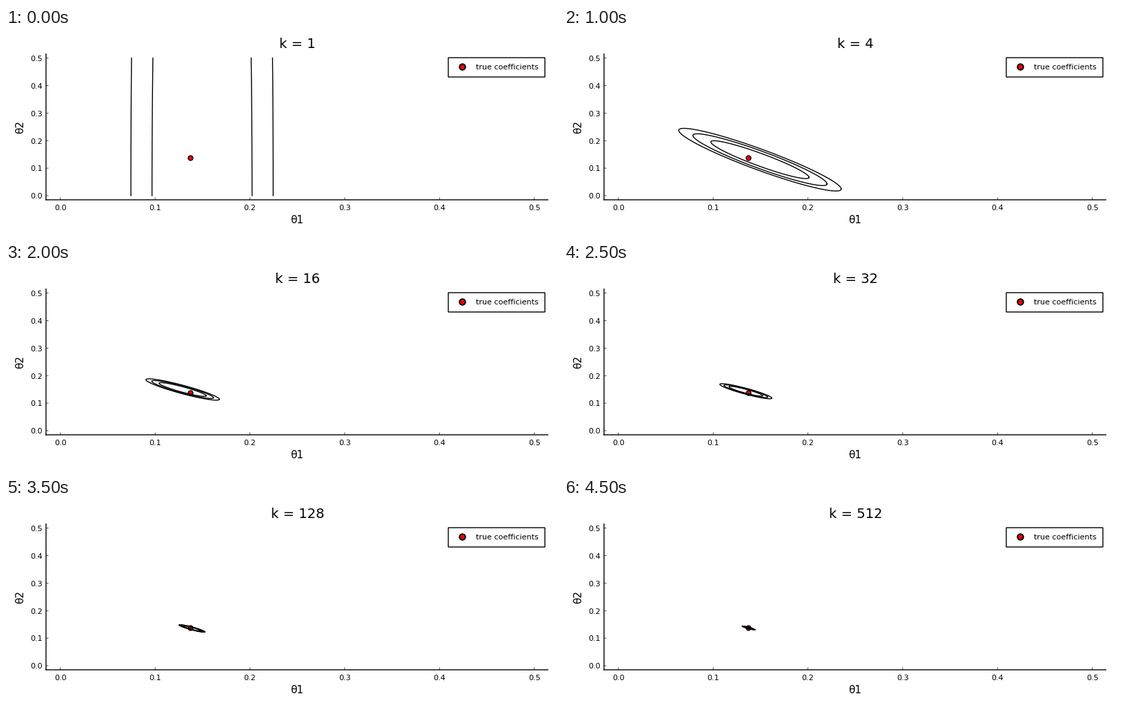
A matplotlib script for the animation above (5000 ms loop, 800x300 px).

```python
import numpy as np
import matplotlib.pyplot as plt
from matplotlib.animation import FuncAnimation
from matplotlib.patches import Rectangle

W, H, DPI = 800, 300, 100
PX = 72 / DPI
XS, YS = 1373.6, 399.0  # pixels per unit
TRUE = 0.137
LINE = 1.0
RED = "#f00000"

plt.rcParams["font.family"] = "DejaVu Sans"
fig = plt.figure(figsize=(W / DPI, H / DPI), dpi=DPI, facecolor="white")
ax = fig.add_axes([0, 0, 1, 1])
ax.set_xlim(0, W)
ax.set_ylim(H, 0)
ax.axis("off")


def px(v):
    return 78.8 + XS * v


def py(v):
    return 243.0 - YS * v


def label(x, y, s, size, ha="center"):
    return ax.text(x, y, s, fontsize=size, ha=ha, va="baseline")


def seg(x, y, width=LINE):
    ax.plot(x, y, color="black", lw=width, solid_capstyle="butt", snap=False)


def dot(x, y, size, edge):
    ax.plot([x], [y], "o", ms=size * PX, mfc=RED, mec="black", mew=edge * PX,
            zorder=2, snap=False)


# axes, ticks and labels
seg([58, 58], [37, 249.7])
seg([57.3, 786], [249, 249])
for v in np.arange(6) / 10:
    seg([px(v)] * 2, [249, 245.5], 0.5)
    seg([58, 61.5], [py(v)] * 2, 0.5)
    label(px(v), 264, f"{v:.1f}", 8)
    label(53.2, py(v) + 4.3, f"{v:.1f}", 8, ha="right")
label(422, 283.4, "θ1", 11)
ax.text(28, 143.2, "θ2", fontsize=11, rotation=90, ha="right", va="center")

# legend
ax.add_patch(Rectangle((641, 43), 140, 28, fc="white", ec="black", lw=LINE,
                       snap=False))
dot(661, 56.3, 8.6, 1.9)
label(681, 60.5, "true coefficients", 8, ha="left")

dot(px(TRUE), py(TRUE), 7.0, 1.3)

title = label(422.7, 29.2, "", 14)
curves = [ax.plot([], [], color="black", lw=LINE, zorder=3)[0] for _ in range(4)]

# path of the posterior mean from k = 2 on, as pixel offsets from the truth
MEANS = [(17, -38), (17, 2.5), (6.5, 0.5), (-11, -5), (-3.5, -2.5),
         (-3.5, -1.5), (2.5, 0.7), (2.5, 0.7), (0.5, 0)]
# half widths in data units and correlation while data are scarce
EARLY = {2: (0.0902, 0.1724, 0.85), 4: (0.0857, 0.1138, 0.935)}
T = np.linspace(0, 2 * np.pi, 241)


def spread(k):
    s = 0.155 / np.sqrt(k)
    return EARLY.get(k, (s, s, 0.915))


def bands():
    """Contours after one observation: only the first coefficient is known."""
    v = np.linspace(0, 1, 60)
    for half in (103.1, 72.5):
        dx = np.sqrt(half ** 2 - 185 * v ** 2)
        for side in (-1, 1):
            yield 284.1 + side * dx, py(v / 2)


def ellipses(n):
    """Evenly spaced log-density contours of a correlated Gaussian."""
    k = 2 ** n
    dx, dy = MEANS[n - 1]
    s1, s2, rho = spread(k)
    step = 0.285 + 0.13 / k
    for i in range(3):
        r = np.sqrt(1 - i * step)
        yield (px(TRUE) + dx + r * s1 * XS * np.cos(T),
               py(TRUE) + dy + r * s2 * YS * np.cos(T - np.arccos(rho)))


def draw(n):
    title.set_text(f"k = {2 ** n}")
    shapes = list(ellipses(n) if n else bands())
    for i, curve in enumerate(curves):
        curve.set_data(*(shapes[i] if i < len(shapes) else ([], [])))
    return [title, *curves]


anim = FuncAnimation(fig, draw, frames=10, interval=500, repeat=True,
                     repeat_delay=0, blit=False)
plt.show()
```
